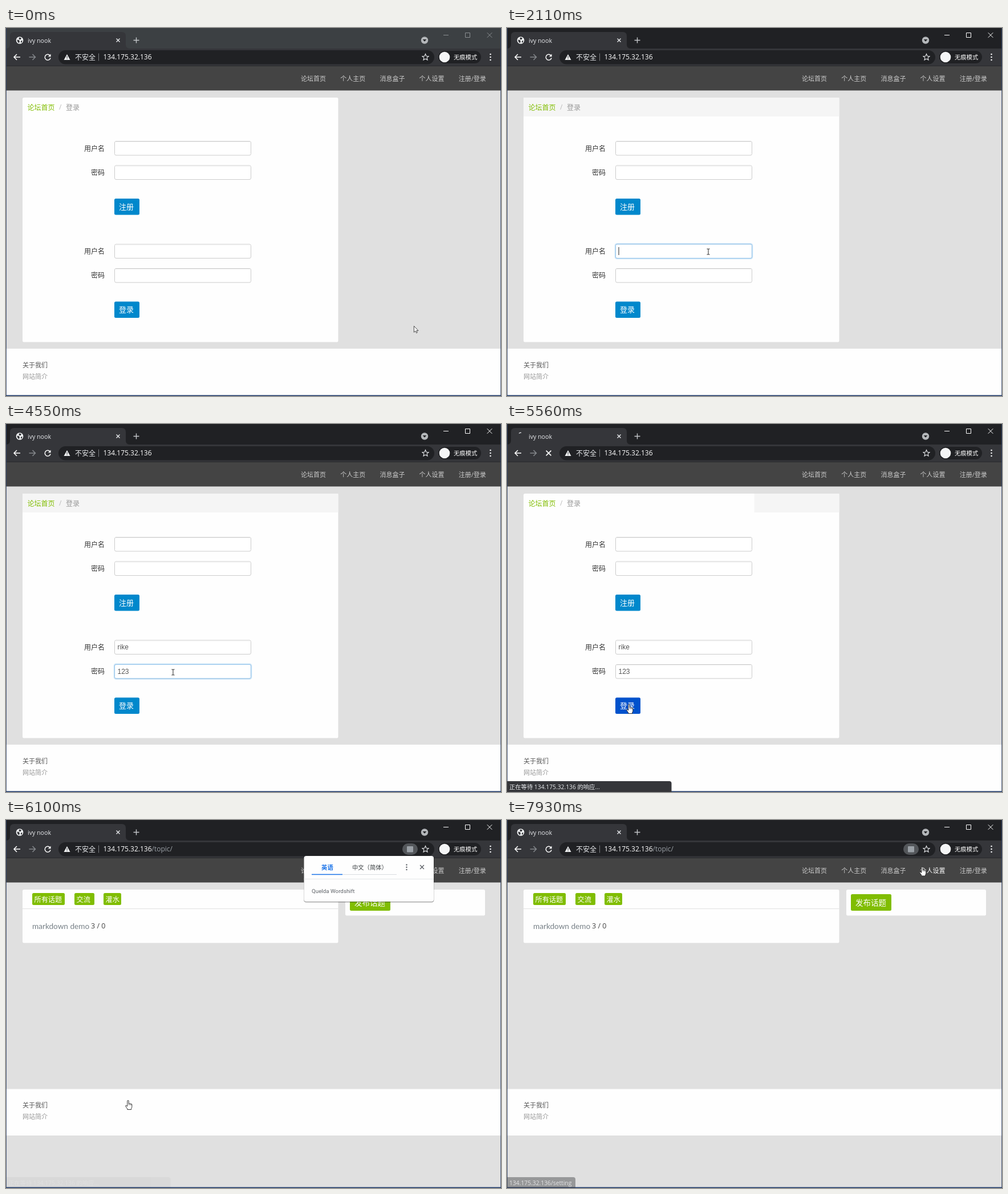
These frames come from a looping animation (868 px wide and 645 px high, 8 s). An HTML page:

```html
<!DOCTYPE html>
<html lang="zh-CN">
<head>
<meta charset="utf-8">
<title>Forum sign-in</title>
<style>
html, body { margin: 0; width: 100%; height: 100%; overflow: hidden; background: #e0e0e0; }
svg { display: block; width: 100vw; height: 100vh; }
text { font-family: 'Open Sans', 'Noto Sans CJK SC', 'Noto Sans CJK', sans-serif; white-space: pre; }
.field { font-family: 'Liberation Sans', Arial, sans-serif; }
.line { fill: none; stroke-linecap: butt; }
</style>
</head>
<body>
<svg id="stage" viewBox="0 0 868 645" xmlns="http://www.w3.org/2000/svg"></svg>
<script>
const LOOP = 8000;
const HOST = '134.175.32.136';
const USER = 'rike', PASS = '123';
const GREEN = '#80bd01', BLUE = '#0088cc', BAR = '#35363a', DARK = '#202124';

// Markup helpers
const rect = (x, y, w, h, fill, extra = '') =>
  `<rect x="${x}" y="${y}" width="${w}" height="${h}" fill="${fill}" ${extra}/>`;
const text = (x, y, size, fill, str, extra = '') =>
  `<text x="${x}" y="${y}" font-size="${size}" fill="${fill}" ${extra}>${str}</text>`;
const line = (d, color, width = 1, extra = '') =>
  `<path class="line" d="${d}" stroke="${color}" stroke-width="${width}" ${extra}/>`;
const dot = (x, y, r, fill, extra = '') => `<circle cx="${x}" cy="${y}" r="${r}" fill="${fill}" ${extra}/>`;
const group = (id, body, extra = '') => `<g id="${id}" ${extra}>${body}</g>`;
const cross = (x, y, r, color, width) =>
  line(`M${x - r} ${y - r}l${2 * r} ${2 * r}M${x + r} ${y - r}l${-2 * r} ${2 * r}`, color, width);

const inputs = [198, 240.5, 378.5, 421].map(y => ({ x: 190, y, w: 240, h: 25.5 }));
const loginButton = { x: 190, y: 479.5, w: 44, h: 28.5 };

function browser() {
  const globe = dot(24, 21.5, 6.3, '#f1f3f4') +
    `<path d="M19.5 20.5l3 .5 1.5 2-1 3.5q-3.5-1.5-3.5-6zM23 16.5l3 .5 1 2-2.500 1.500-2-1zM26 22.500l2.800-.5q-.5 3-2.800 4z" fill="${BAR}"/>`;
  const reload = line('M77.500 48.700A5 5 0 1 0 78 52.500', '#fff', 1.5) + '<path d="M78.500 45.500v4.700h-4.700z" fill="#fff"/>';
  return rect(0, 0, 868, 67, DARK, 'id="strip"') +
    `<path d="M0 36q7 0 7-7V14q0-7 7-7H203q7 0 7 7V29q0 7 7 7z" fill="${BAR}"/>` +
    rect(0, 36, 868, 30, BAR) + rect(0, 66, 868, 1, '#28292c') +
    group('globe', globe) +
    group('spinner', line('M21 16.500q2-1.600 4-1.200', '#e8eaed', 1.3)) +
    text(38, 25.5, 10.6, '#e8eaed', 'ivy nook') +
    cross(196.500, 21.500, 3, '#e8eaed', 1.4) +
    line('M223.500 21.500h10M228.500 16.500v10', '#c4c7ca', 1.4) +
    dot(734, 21.500, 6.2, '#b4b7ba') + `<path d="M730.800 20h6.400l-3.200 3.700z" fill="${DARK}"/>` +
    group('controls', line('M767 12.500h9M805.500 8.500h8v8h-8z', 'currentColor') +
      cross(848, 12.500, 4.3, 'currentColor', 1)) +
    line('M25 51H14.500M19 46l-5 5 5 5', '#fff', 1.5) +
    line('M40.500 51H51M46.500 46l5 5-5 5', '#85888c', 1.5) +
    group('reload', reload) + group('stop', cross(73, 51, 4.4, '#fff', 1.6)) +
    rect(92, 39, 659, 24.5, DARK, 'rx="12.2"') +
    '<path d="M107 46l5.500 10h-11z" fill="#f1f3f4"/>' + rect(106.5, 49.500, 1.1, 3, DARK) + rect(106.5, 53.500, 1.1, 1.1, DARK) +
    text(121, 55.5, 12, '#e8eaed', '不安全') + rect(162, 44.500, 1, 13, '#7a7d81') +
    text(170.500, 55.3, 12, '#fff', `${HOST}<tspan id="route" fill="#9aa0a6">/topic/</tspan>`) +
    group('lang', rect(695, 41, 27, 20, '#53565a', 'id="langPill" rx="10"') + rect(703, 46, 11, 10.5, '#9aa0a6', 'rx="1"')) +
    line('M735.500 45.500l1.600 3.700 4 .4-3 2.600.9 3.900-3.500-2-3.500 2 .9-3.900-3-2.600 4-.4z', '#e8eaed', 1.1) +
    rect(758, 40, 75, 22, DARK, 'rx="11"') + dot(769, 51, 9.3, '#f4f5f6') +
    text(785, 55, 10.3, '#fff', '无痕模式') +
    [46, 51, 56].map(y => dot(849.500, y, 1.3, '#f1f3f4')).join('');
}

function navbar() {
  const items = ['论坛首页', '个人主页', '消息盒子', '个人设置', '注册/登录'];
  return rect(0, 67, 868, 42.500, '#444') +
    items.map((s, i) => text(517 + 69.2 * i, 93, 11, '#ccc', s, `id="nav${i}"`)).join('');
}

function form() {
  const label = (y, s) => text(173, y, 12, '#333', s, 'text-anchor="end"');
  const button = (y, s, id) => rect(190, y, 44, 28.5, BLUE, `rx="2.5" id="${id}"`) + text(198, y + 18.7, 13, '#fff', s);
  const boxes = inputs.map(({ x, y, w, h }, i) =>
    rect(x + .5, y + .5, w - 1, h - 1, '#fff', 'rx="2.5" stroke="#ccc"') +
    rect(x + 1.5, y + 1, w - 3, 1, '#eee') +
    group('focus' + i, rect(x - .5, y - .5, w + 1, h + 1, 'none', 'rx="3.500" stroke="#52a8ec" stroke-opacity=".25" stroke-width="2"') +
      rect(x + .5, y + .5, w - 1, h - 1, '#fff', 'rx="2.500" stroke="#8cbfe8"'), 'opacity="0"')).join('');
  return rect(29, 122, 553.500, 428.500, '#fefefe', 'rx="2.500"') +
    rect(29, 122, 553.500, 33, '#f5f5f5', 'id="crumb"') +
    text(37.500, 143.500, 12, GREEN, '论坛首页') + text(93, 143, 12, '#bbb', '/') + text(105, 143.500, 12, '#999', '登录') +
    boxes + label(215.500, '用户名') + label(257.500, '密码') + label(395.500, '用户名') + label(438, '密码') +
    button(299, '注册', 'signUp') + button(loginButton.y, '登录', 'logIn') +
    text(195.500, 395.300, 12, '#555', '', 'class="field" id="user"') +
    text(195.500, 438, 12, '#555', '', 'class="field" id="pass"') +
    rect(0, 0, 1, 14, '#222', 'id="caret"');
}

function topics() {
  const tag = (x, w, s) => rect(x, 128, w, 21, GREEN, 'rx="2.500"') + text(x + 3.500, 143.500, 12.2, '#fff', s);
  return rect(29, 122, 553.500, 93.500, '#fefefe', 'rx="2.500"') + rect(29, 155, 553.500, 1, '#e2e2e2') +
    tag(46, 57, '所有话题') + tag(120, 35, '交流') + tag(171, 31, '灌水') +
    text(46, 191, 13.6, '#778087', 'markdown demo', `style="font-family:Lato,'Open Sans',sans-serif"`) +
    text(149, 190, 12.5, '#444', '3 / 0') +
    rect(595, 122, 245, 45.500, '#fefefe', 'rx="2.500"') +
    rect(603, 130, 71, 29, GREEN, 'rx="2.500"') + text(611, 149.800, 13.5, '#fff', '发布话题');
}

const footer = () => rect(0, 562, 868, 81.500, '#fefefe') +
  text(29, 594.500, 11, '#555', '关于我们') + text(29, 614.500, 11, '#999', '网站简介');

function popup() {
  return rect(523, 65, 227, 80, '#000', 'rx="4" opacity=".12"') +
    rect(522, 63, 228.500, 81, '#000', 'rx="4" opacity=".3"') +
    rect(522.500, 63, 227.500, 80, '#fefefe', 'rx="4"') +
    text(553, 87, 10.4, '#1a73e8', '英语', 'font-weight="700"') +
    text(607, 87, 10.3, '#3c4043', '中文（简体）', 'font-weight="500"') +
    rect(590, 95, 95, 1, '#dadce0') + rect(536, 94.700, 54, 1.500, '#1a73e8') +
    [78.500, 82.700, 87].map(y => dot(702.500, y, 1.2, '#5f6368')).join('') +
    cross(729.500, 82.500, 3.4, '#5f6368', 1.4) + rect(522.500, 103, 227.500, 1, '#e4e6e8') +
    text(536, 128, 9.8, '#5f6368', 'Quelda Wordshift', 'style="font-family:Roboto,sans-serif"');
}

const status = (id, w, s) => group(id,
  `<path d="M0 626H${w - 4}q4 0 4 4V645H0z" fill="${BAR}"/>` + text(4, 639.700, 10.3, '#e8eaed', s));

const pointers =
  group('arrow', '<path d="M.4.4V11.300l2.500-2.300 1.700 3.600 1.700-.8-1.600-3.400H8z" fill="#fff" stroke="#222" stroke-width=".8"/>') +
  group('beam', line('M-2.500-4.800h1.800l.7.600.7-.6h1.800M-2.500 5h1.800l.7-.6.7.6h1.800M0-4.500V4.800', '#222', 1)) +
  group('hand', '<path d="M-1.200 8.600V1.200q0-1.200 1.200-1.200t1.200 1.200V5.600q1-.8 2 .2 1-.6 2 .4 1.600-.4 1.600 1.200V11q0 2-1.200 3.200V16H-1.200V14.600L-4.200 10.400q-.6-1.600 1-1.600l2 1.600z" fill="#fff" stroke="#222" stroke-width=".9" stroke-linejoin="round"/>' +
    line('M1.300 5.600v2.600M3.300 6v2.400M5.200 6.600v2', '#222', .6));

document.getElementById('stage').innerHTML =
  rect(0, 0, 868, 645, '#e0e0e0') + browser() + navbar() +
  group('form', form()) + group('topics', topics()) + group('footer', footer()) +
  rect(0, 643.500, 868, 1.500, '#1f3a6b') +
  line('M.5 0V645M867.500 0V645', '#2b3f66', 1, 'opacity=".8"') +
  group('popup', popup()) +
  status('waiting', 288.500, `正在等待 ${HOST} 的响应...`) + status('link', 120, HOST + '/setting') +
  dot(0, 0, 10, '#ffff4d', 'id="click" fill-opacity=".75"') + pointers;

const el = {};
document.querySelectorAll('[id]').forEach(node => el[node.id] = node);
const set = (id, name, value) => el[id].setAttribute(name, value);
const show = (id, on) => set(id, 'opacity', +on);

// Progress 0..1 advancing in n visible steps, the first at a and the last at b
function steps(t, a, b, n) {
  if (t < a) return 0;
  return Math.min(1, (Math.floor((t - a) / (b - a) * (n - 1) + .15) + 1) / n);
}
const ease = p => p * p * (3 - 2 * p);
const mix = (a, b, p) => a + (b - a) * p;
const between = (t, a, b) => t >= a && t < b;
const inside = (b, x, y) => x >= b.x && x <= b.x + b.w && y >= b.y && y <= b.y + b.h;

const moves = [
  { a: 900, b: 1540, n: 9, to: [353, 392] },
  { a: 4240, b: 5020, n: 11, to: [214, 491.500] },
  { a: 6500, b: 7270, n: 10, to: [718, 94] },
  { a: 7360, b: 7450, n: 2, to: [728, 82] }
];

function pointerAt(t) {
  let pos = [715, 522];
  for (const { a, b, n, to } of moves) {
    const p = ease(steps(t, a, b, n));
    pos = pos.map((v, i) => mix(v, to[i], p));
  }
  return pos;
}

function pointerKind(t, x, y) {
  if (t >= 5640) return t < 6500 || t >= 7850 ? 'hand' : 'arrow';
  if (inputs.some(b => inside(b, x, y))) return 'beam';
  return inside(loginButton, x, y) ? 'hand' : 'arrow';
}

function draw(t) {
  const active = t >= 1890, loading = between(t, 5480, 5640), topic = t >= 5640;

  set('strip', 'fill', active ? DARK : '#3c4043');
  set('controls', 'color', active ? '#fff' : '#8b8f92');
  show('globe', !loading);
  show('spinner', loading);
  show('reload', !loading);
  show('stop', loading);
  show('route', topic);
  set('route', 'fill-opacity', +topic);
  show('lang', topic);
  show('langPill', t >= 5790);

  show('form', !topic);
  show('topics', topic);
  set('footer', 'transform', `translate(0 ${topic ? -90.5 : 0})`);
  set('nav3', 'fill', t >= 7850 ? '#fff' : '#ccc');

  show('crumb', active);
  set('crumb', 'x', loading ? 433.500 : 29);
  set('crumb', 'width', loading ? 149 : 553.500);

  const toPass = steps(t, 3140, 3380, 4);
  set('focus2', 'opacity', steps(t, 1890, 2110, 4) * (t < 3300 ? 1 : 1 - toPass));
  set('focus3', 'opacity', Math.min(1, toPass * 1.5) * (1 - steps(t, 5320, 5560, 4)));

  const typedUser = Math.round(4 * steps(t, 2510, 2760, 4));
  const typedPass = Math.round(3 * steps(t, 3610, 3790, 3));
  el.user.textContent = USER.slice(0, typedUser);
  el.pass.textContent = PASS.slice(0, typedPass);
  const field = t < 3140 ? el.user : el.pass;
  set('caret', 'x', 195.5 + (field.textContent ? field.getComputedTextLength() : 0));
  set('caret', 'y', t < 3140 ? 384 : 426.500);
  show('caret', between(t, 1890, 4400));

  const hover = steps(t, 4860, 5020, 3);
  set('logIn', 'fill', `rgb(0,${mix(136, 82, hover)},204)`);

  set('popup', 'opacity', t < 7770 ? steps(t, 5870, 5950, 2) : 0);
  set('waiting', 'opacity', between(t, 5480, 7690) ? 1 - .96 * steps(t, 5950, 6100, 3) : 0);
  set('link', 'opacity', .42 * steps(t, 7850, 7930, 2));

  const [x, y] = pointerAt(t);
  const kind = pointerKind(t, x, y);
  for (const id of ['arrow', 'beam', 'hand']) show(id, id === kind);
  set(kind, 'transform', `translate(${x} ${y})`);
  set('click', 'transform', `translate(${x - 1.5} ${y})`);
  show('click', between(t, 1810, 1960) || between(t, 5320, 5480) || between(t, 7690, 7770));
}

function tick() {
  draw(performance.now() % LOOP);
  requestAnimationFrame(tick);
}
draw(0);
tick();
</script>
</body>
</html>
```
